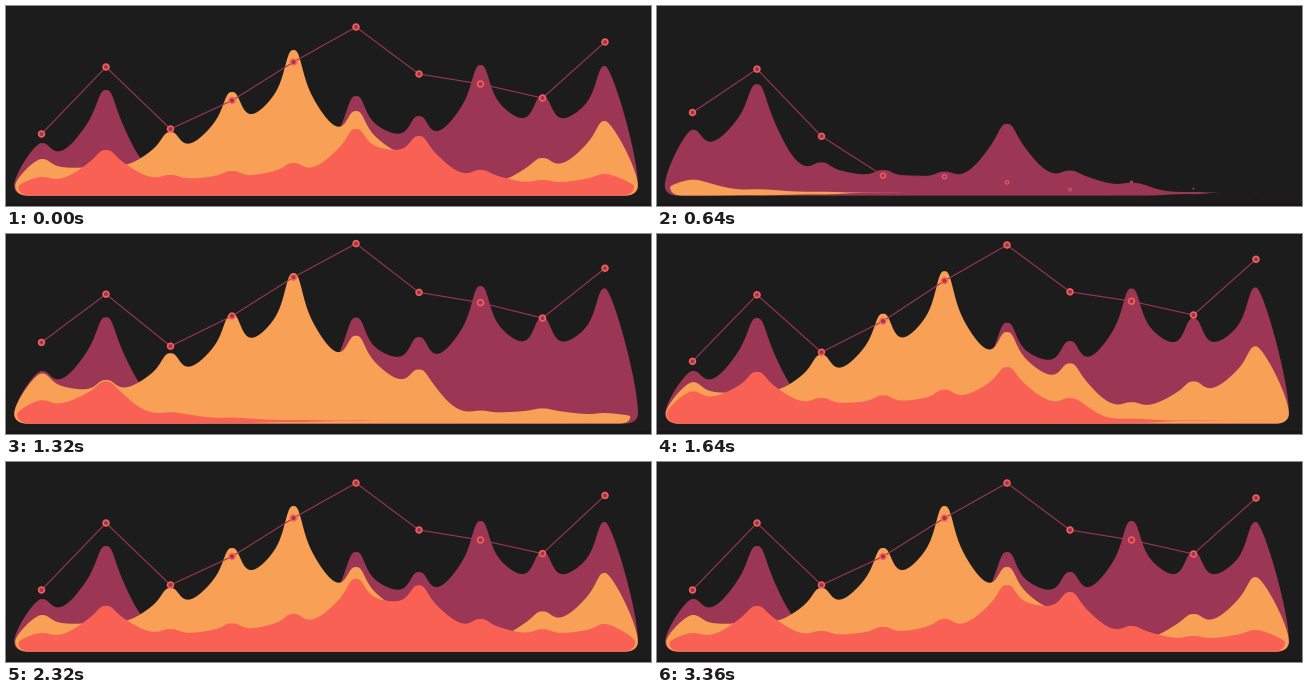
Animation, 645 px wide and 200 px high, one loop 4.36 s. Source, as a matplotlib script:

```python
import matplotlib.pyplot as plt
import numpy as np
from matplotlib.animation import FuncAnimation
from matplotlib.collections import LineCollection
from matplotlib.patches import Circle, Polygon, Rectangle

W, H, DPI = 645, 200, 100
STEP, FRAMES, END = 40, 109, 3360
BG, FLOOR = "#1c1c1c", "#1b1618"
PLUM, ORANGE, CORAL = "#9b3655", "#f8a055", "#f96155"

BASE, SKIRT = 186.5, 2.5      # zero line and depth of the shapes below it
LAG, SERIES_LAG = 86, 485     # delay per point and per area
X = np.array([35.5, 100, 164.5, 226, 287.5, 350, 413, 474.5, 536.5, 599])
IDX = np.arange(len(X))

AREAS = [
    (PLUM, [52, 105, 28, 22, 23, 99, 79, 130, 99, 129]),
    (ORANGE, [36, 36, 63, 103, 145, 84, 53, 15, 37, 74]),
    (CORAL, [18, 45, 20, 24, 32, 66, 59, 25, 15, 21]),
]
AREA_LIFT = np.where(IDX == 0, 14, 7)

LINE_Y = np.array([128, 61, 123, 94.5, 56, 21, 68, 78, 92, 36])
LINE_MID = np.array([294, 336, 530, 781, 804, 855, 920, 814, 881, 1050])
LINE_LIFT = np.array([29, 1, 12, 13, 13, 12, 11, 11, 11, 11])


def logistic(v):
    return 1 / (1 + np.exp(-np.clip(v, -40, 40)))


def hump(s, start, stop):
    return np.sin(np.pi * np.clip((s - start) / (stop - start), 0, 1))


def area_heights(target, t, order):
    s = t - SERIES_LAG * order - LAG * IDX
    d = s - 172
    rise = logistic(d / np.where(d < 0, 62, 40))
    rise = np.clip((rise - 0.01) / 0.99, 0, 1)
    return np.array(target) * rise + AREA_LIFT * hump(s, 230, 1270)


def line_heights(t):
    rise = logistic((t - LINE_MID) / 80)
    lift = LINE_LIFT * hump(t - LAG * IDX, 250, 1650)
    return 187 - (187 - LINE_Y) * rise - lift


def line_segments(y, t):
    """Each segment grows from its left point to its right one."""
    p = np.column_stack([X, y])
    grown = np.clip((t - LAG * IDX[:-1] - 148) / 172, 0, 1)
    return [(a, a + (b - a) * g) for a, b, g in zip(p, p[1:], grown) if g > 0]


def bezier(a, b, c, d, n=24):
    u = np.linspace(0, 1, n)[:, None]
    a, b, c, d = map(np.array, (a, b, c, d))
    return ((1 - u) ** 3 * a + 3 * u * (1 - u) ** 2 * b
            + 3 * u ** 2 * (1 - u) * c + u ** 3 * d)


def ridge(h):
    """Rounded peaks at the points, sagging valleys between them."""
    u = np.linspace(0, 1, 40, endpoint=False)
    w = u ** 3 * (10 - 15 * u + 6 * u * u)
    d3 = np.sin(np.pi * u) ** 3
    dip = 1.15 * d3 / (d3 + 0.15)
    logs = np.log(np.maximum(h, 1e-4))
    xs, hs = [], []
    for i in range(len(X) - 1):
        mean = np.exp((logs[i] + logs[i + 1]) / 2)
        sag = 0.31 * mean / (mean + 10)
        xs.append(X[i] + u * (X[i + 1] - X[i]))
        hs.append(np.exp(logs[i] * (1 - w) + logs[i + 1] * w) * (1 - sag * dip))
    return np.append(np.concatenate(xs), X[-1]), np.append(np.concatenate(hs), h[-1])


def edges(h):
    """Upper and lower edge for a height; both meet at zero."""
    b = SKIRT * (1 - np.exp(-h / SKIRT))
    return BASE - h + b, BASE + 1.25 * b


def cap(x, h, side):
    """Curve from the end point down round the outer corner."""
    edge = (7.5 if side < 0 else 632) - side * 14 * np.exp(-h / 17)
    top, bottom = edges(h)
    mid = BASE - 7 * (1 - np.exp(-h / 10))
    bend = mid - (mid - top) * 0.26
    down = bezier((x, top), (x + side * 7, top), (edge, bend), (edge, mid))
    turn = bezier((edge, mid), (edge, mid + 2 * (bottom - BASE)),
                  (edge - side * 5, bottom), (edge - side * 13, bottom))
    return np.vstack([down, turn])


def outline(h):
    xs, hs = ridge(h)
    top, low = edges(hs)
    return np.vstack([np.column_stack([xs, top]), cap(X[-1], h[-1], 1),
                      np.column_stack([xs, low])[::-1], cap(X[0], h[0], -1)[::-1]])


fig = plt.figure(figsize=(W / DPI, H / DPI), dpi=DPI, facecolor=BG)
ax = fig.add_axes([0, 0, 1, 1])
ax.set_xlim(0, W)
ax.set_ylim(H, 0)
ax.axis("off")
ax.add_patch(Rectangle((0, 196.5), W, 4, fc=FLOOR, lw=0))

shapes = [ax.add_patch(Polygon([(0, 0), (1, 0), (1, 1)], fc=color, lw=0, snap=False))
          for color, _ in AREAS]
line = ax.add_collection(LineCollection([], colors=PLUM, linewidths=0.8, zorder=3))
dots = [ax.add_patch(Circle((x, BASE), 3, fc=PLUM, ec=CORAL, zorder=4)) for x in X]


def draw(n):
    t = END if n == 0 else min(n * STEP, END)
    for k, (shape, (_, target)) in enumerate(zip(shapes, AREAS)):
        h = area_heights(target, t, k)
        shape.set_xy(outline(h))
        shape.set_visible(bool(h.max() > 0.5))

    y = line_heights(t)
    line.set_segments(line_segments(y, t))
    size = np.clip(0.28 + 0.0015 * (t - LAG * IDX), 0, 1)
    for dot, x, cy, k in zip(dots, X, y, size):
        dot.center = (x, cy)
        dot.set_radius(2.9 * k)
        dot.set_linewidth(1.15 * k)
        dot.set_visible(bool(k > 0.05))
    return [*shapes, line, *dots]


anim = FuncAnimation(fig, draw, frames=FRAMES, interval=STEP,
                     init_func=lambda: draw(0), repeat=True, repeat_delay=0)
plt.show()
```
